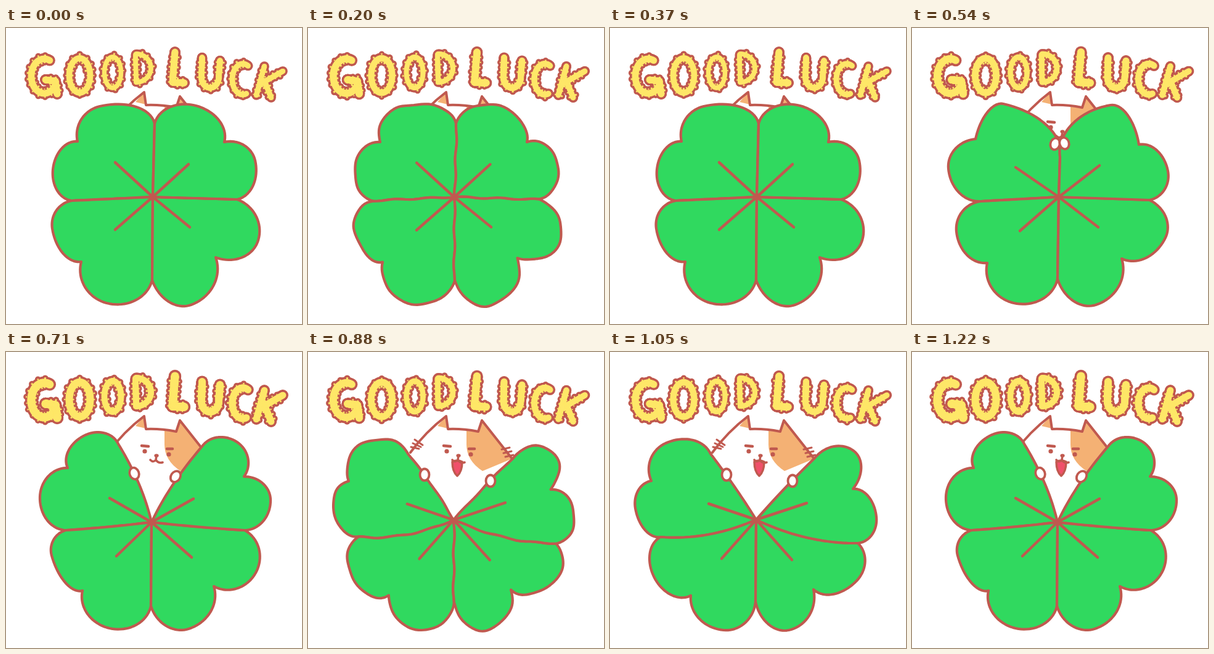
An HTML page with a canvas for the animation above (1.39 s loop, 480 by 480 pixels).

```html
<!DOCTYPE html>
<html lang="en">
<head>
<meta charset="utf-8">
<title>Good luck</title>
<style>
html, body { margin: 0; width: 100%; height: 100%; overflow: hidden; background: #fff; }
canvas { display: block; width: 480px; height: 480px; }
</style>
</head>
<body>
<canvas id="stage" width="480" height="480" role="img" aria-label="GOOD LUCK"></canvas>
<script>
const ctx = document.getElementById('stage').getContext('2d');
const INK = '#c0594f', GREEN = '#30d95f', YELLOW = '#fee768', ORANGE = '#f4b174', PINK = '#f0506a';
const FIRST = 200, STEP = 170, LOOP = FIRST + 7 * STEP;

const parse = s => s.split(' ').map(p => p.split(',').map(Number));

// ring: joint, lobe top, corner, lobe top, joint ... counterclockwise from the upper left leaf.
// bow: how far the upper and the side edges bend.
const poses = {
  shut: {
    center: [238, 274], bow: [0, 0],
    ring: parse('241,155 152,127 116,184 76,230 107,280 75,325 122,379 163,446 237,409 300,449 340,372 408,347 375,278 404,215 354,185 308,126 241,155'),
    veins: parse('177,218 296,221 177,327 298,323')
  },
  peek: {
    center: [238, 274], bow: [0, 0],
    ring: parse('240,210 148,123 103,180 59,228 112,281 72,330 122,381 165,446 236,407 298,449 340,374 411,340 385,279 415,232 368,189 322,125 240,210'),
    veins: parse('168,226 304,223 175,329 302,323'),
    paws: [[232, 188, .3], [247, 187, -.3]]
  },
  open: {
    center: [236, 276], bow: [6, 1],
    ring: parse('182,149 128,135 100,188 55,235 97,289 74,330 124,387 168,448 235,412 296,449 337,380 405,358 387,289 429,240 386,202 376,147 318,153'),
    veins: parse('168,237 304,238 179,331 301,333'),
    paws: [[208, 197, -.35], [275, 202, .6]]
  },
  wide: {
    center: [237, 272], bow: [2, 10],
    ring: parse('163,165 90,148 67,209 41,253 82,300 72,366 131,395 184,451 236,405 290,451 330,385 400,371 402,310 432,268 394,222 396,161 332,172'),
    veins: parse('160,246 319,245 181,335 295,337'),
    paws: [[189, 199, 0], [296, 209, 0]], whiskers: true
  }
};

// seed and fat vary the lettering; boil shakes the drawn line.
const steps = [
  { pose: 'shut', seed: 1, fat: 0 },
  { pose: 'shut', seed: 4, fat: .3, boil: 1 },
  { pose: 'shut', seed: 1, fat: 0 },
  { pose: 'peek', seed: 2, fat: .6 },
  { pose: 'open', seed: 3, fat: 1.2 },
  { pose: 'wide', seed: 2, fat: .6, boil: 1, shout: true },
  { pose: 'wide', seed: 4, fat: .3, shout: true },
  { pose: 'open', seed: 3, fat: 1.2, shout: true }
];

const line = (x1, y1, x2, y2) => t => [x1 + (x2 - x1) * t, y1 + (y2 - y1) * t];
const arc = (x, y, rx, ry, from, to) => t => {
  const a = (from + (to - from) * t) * Math.PI / 180;
  return [x + rx * Math.cos(a), y + ry * Math.sin(a)];
};

// Half stroke width, then the strokes.
const letters = [
  [10.5, arc(62, 78, 21, 28, -65, -330), line(64, 84, 80, 86), line(80, 86, 83, 107)],
  [10, arc(119.5, 77, 17, 28, 0, 360)],
  [8.8, arc(173, 72, 13.5, 25, 0, 360)],
  [8.8, line(210, 43, 211, 88), arc(211, 65, 24, 23, -90, 90)],
  [10.5, line(274, 39, 270, 88), line(270, 88, 289, 89)],
  [9.8, line(318, 48, 317, 80), arc(331, 80, 14, 17, 180, 0), line(345, 80, 347, 53)],
  [9.5, arc(384, 83, 17, 25, -60, -290)],
  [9.2, line(419, 62, 406, 109), line(449, 70, 414, 90), line(420, 88, 430, 113)]
];

function random(seed) {
  let n = seed * 7919;
  return () => (n = (n * 16807 + 11) % 2147483647) / 2147483647;
}

function trace(pts, fill, width = 0, close = false) {
  ctx.beginPath();
  pts.forEach(p => ctx.lineTo(...p));
  if (close) ctx.closePath();
  if (fill) { ctx.fillStyle = fill; ctx.fill(); }
  if (width) { ctx.lineWidth = width; ctx.stroke(); }
}

function oval(x, y, rx, ry, turn, fill, width = 0) {
  ctx.beginPath();
  ctx.ellipse(x, y, rx, ry, turn, 0, 7);
  ctx.fillStyle = fill;
  ctx.fill();
  if (width) { ctx.lineWidth = width; ctx.stroke(); }
}

function path(d, width, fill) {
  const p = new Path2D(d);
  if (fill) { ctx.fillStyle = fill; ctx.fill(p); }
  if (width) { ctx.lineWidth = width; ctx.stroke(p); }
}

// Two quarter ellipses on the chord a-b that meet at its highest point, top.
function lobe(a, top, b) {
  const d = [b[0] - a[0], b[1] - a[1]];
  const u = ((top[0] - a[0]) * d[0] + (top[1] - a[1]) * d[1]) / (d[0] ** 2 + d[1] ** 2);
  const foot = a.map((v, j) => v + u * d[j]);
  return Array.from({ length: 41 }, (_, i) => {
    const angle = Math.PI * i / 40, end = i < 20 ? a : b, c = Math.abs(Math.cos(angle));
    return foot.map((f, j) => f + (end[j] - f) * c + (top[j] - f) * Math.sin(angle));
  });
}

// Edge bent by (dx, dy) at its middle.
function edge(a, b, dx, dy) {
  return Array.from({ length: 21 }, (_, i) => {
    const t = i / 20, bend = 4 * t * (1 - t);
    return [a[0] + (b[0] - a[0]) * t + dx * bend, a[1] + (b[1] - a[1]) * t + dy * bend];
  });
}

function clover({ center, ring, bow, veins }, boil = 0) {
  const shake = ([x, y]) => [x + boil * Math.sin(y / 9), y + boil * Math.cos(x / 9)];
  const spoke = i => i % 16 === 0 ? edge(center, ring[i], i ? -bow[0] : bow[0], 0)
    : edge(center, ring[i], 0, i === 8 ? 0 : bow[1]);
  for (let i = 0; i < 16; i += 4) {
    const [a, m, k, n, b] = ring.slice(i, i + 5);
    const outline = [...spoke(i), ...lobe(a, m, k), ...lobe(k, n, b), ...spoke(i + 4).reverse()];
    trace(outline.map(shake), GREEN, 4.2, true);
  }
  veins.forEach(v => trace([center, v].map(shake), null, 4.5));
}

function cat(shout) {
  const ears = 'L224,104 L227,125 Q250,124 276,129 L282,111';
  path(`M166,163 Q191,129 224,104 ${ears} L331,173 L238,270 Z`, 0, '#fff');
  path('M257,128 L276,129 L282,111 L331,173 L283,193 Q257,176 257,150 Z', 0, ORANGE);
  path('M210,120 L224,104 L227,124 Z', 0, ORANGE);
  path(`M166,163 Q191,129 224,104 ${ears} L331,173`, 4);

  path('M220,152 L231,153 M261,157 L270,157', 4.5);
  oval(225, 161, 3.6, 3.6, 0, INK);
  oval(264, 166, 3.6, 3.6, 0, INK);
  if (shout) path('M234,178 Q242,174 250,178 Q250,194 242,201 Q234,194 234,178 Z', 3.4, PINK);
  oval(244, 168, 3.6, 2.8, 0, INK);
  path('M244,168 L243,175 Q239,180 234,175 M243,175 Q247,181 254,179', 3.6);
}

function whiskers() {
  for (let i = 0; i < 3; i++) {
    const x = 3 * i, y = 6 * i;
    path(`M${173 - x},${142 + y} l13,${9 - y / 2} M${314 + x},${158 + y} l13,-3`, 3);
  }
}

// Cloud shape: a round stroke with random bumps on both sides.
function cloud(stroke, r, rand) {
  const dots = [], count = 60;
  let run = 0, last = stroke(0);
  for (let i = 0; i <= count; i++) {
    const [x, y] = stroke(i / count);
    const [nx, ny] = stroke((i + .1) / count);
    const len = Math.hypot(nx - x, ny - y);
    dots.push([x, y, r - 1.5]);
    run += Math.hypot(x - last[0], y - last[1]);
    last = [x, y];
    if (run < 8) continue;
    run = 0;
    for (const side of [-1, 1]) {
      const off = side * (r - 5 + 1.6 * rand()) / len;
      dots.push([x - (ny - y) * off, y + (nx - x) * off, 4.6 + .8 * rand()]);
    }
  }
  return dots;
}

function lettering(seed, fat) {
  const rand = random(seed);
  for (const [r, ...strokes] of letters) {
    const dots = strokes.flatMap(s => cloud(s, r + fat, rand));
    dots.forEach(([x, y, size]) => oval(x, y, size, size, 0, INK));
    dots.forEach(([x, y, size]) => oval(x, y, size - 3.6, size - 3.6, 0, YELLOW));
  }
}

function draw({ pose: name, seed, fat, boil, shout }) {
  const pose = poses[name];
  ctx.fillStyle = '#fff';
  ctx.fillRect(0, 0, 480, 480);
  ctx.strokeStyle = INK;
  ctx.lineCap = ctx.lineJoin = 'round';
  lettering(seed, fat);
  cat(shout);
  clover(pose, boil);
  if (pose.whiskers) whiskers();
  (pose.paws || []).forEach(([x, y, turn]) => oval(x, y, 7.5, 9.5, turn, '#fff', 3.8));
}

const start = performance.now();
let shown = -1;
function tick() {
  const t = (performance.now() - start) % LOOP;
  const i = t < FIRST ? 0 : 1 + Math.floor((t - FIRST) / STEP);
  if (i !== shown) draw(steps[shown = i]);
  requestAnimationFrame(tick);
}
tick();
</script>
</body>
</html>
```
